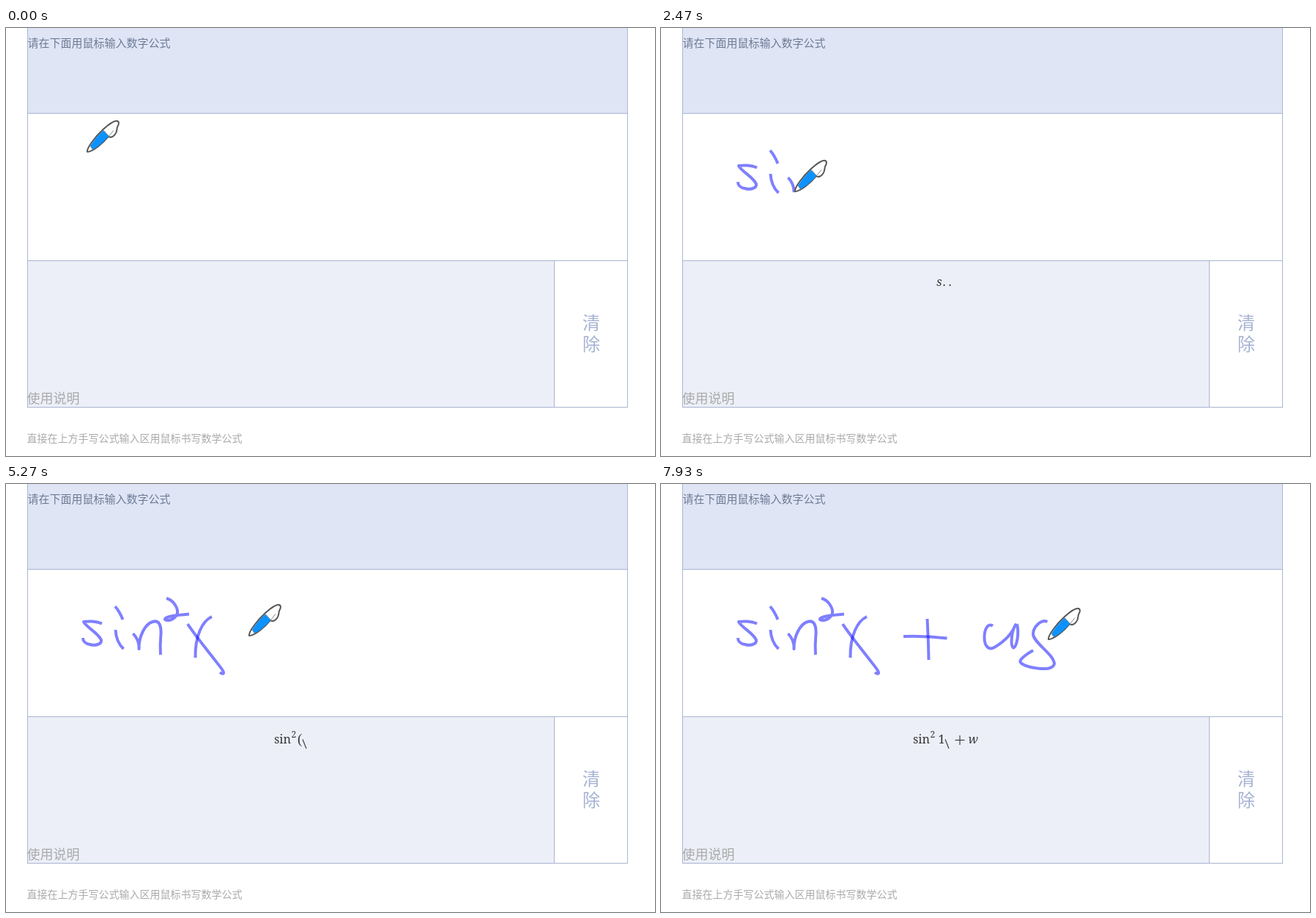
An HTML page that plays this animation: 886x584 px, repeating every 8000 ms.

```html
<!DOCTYPE html>
<html lang="zh">
<head>
<meta charset="utf-8">
<title>手写公式</title>
<style>
html, body { margin: 0; width: 100%; height: 100%; overflow: hidden; background: #fff; }
svg { display: block; width: 886px; height: 584px; }
.ui { font-family: "Noto Sans CJK SC", "Noto Sans CJK", sans-serif; }
.box { stroke: #abb5d2; stroke-width: 1; }
#ink path { fill: none; stroke: #00f; stroke-opacity: .5; stroke-width: 4; stroke-linejoin: round; }
#math { font-family: "Noto Serif", serif; font-size: 16.3px; fill: #333; }
#math path { fill: none; stroke: #333; stroke-width: 1.1; }
.it { font-style: italic; }
</style>
</head>
<body>
<svg viewBox="0 0 886 584">
  <rect class="box" x="29.5" y="-5.5" width="819" height="122" fill="#dfe5f5"/>
  <rect class="box" x="29.5" y="116.5" width="819" height="201" fill="#fff"/>
  <rect class="box" x="29.5" y="317.5" width="719" height="200" fill="#eceff7"/>
  <rect class="box" x="748.5" y="317.5" width="100" height="200" fill="#fff"/>
  <g class="ui" fill="#aaa">
    <text x="29.5" y="26" font-size="15" fill="#6d7a95">请在下面用鼠标输入数字公式</text>
    <text x="787" y="411" font-size="24" fill="#a5b2d1">清</text>
    <text x="787" y="440" font-size="24" fill="#a5b2d1">除</text>
    <text x="28.5" y="512" font-size="18">使用说明</text>
    <text x="28.5" y="565" font-size="14">直接在上方手写公式输入区用鼠标书写数学公式</text>
  </g>
  <g id="math"></g>
  <g id="ink"></g>
  <g id="pen" stroke-linejoin="round">
    <path fill="#fff" stroke="#555" stroke-width="2" d="M111 169C110 164 121 149 133 138C142 130 149 126 152 127C155 128 154 132 152 135C151 138 152 141 149 145C146 149 143 150 140 148C132 158 118 169 111 169Z"/>
    <path fill="#0c92ff" d="M115 161C120 153 127 145 133 139.500L140.500 147.500C134 155 126 162 118.500 166Z"/>
    <path fill="none" stroke="#888" stroke-width="1" d="M133 139.500L140.500 147.500L147 139.500M115 161L118.500 166"/>
  </g>
</svg>
<script>
const LOOP = 8000, FPS = 15;
const NS = 'http://www.w3.org/2000/svg';
const ink = document.getElementById('ink');
const pen = document.getElementById('pen');
const math = document.getElementById('math');

// start, end, path, easing power
const strokes = [
  [650, 1400, 'M131 190.500C123 187 112 187 106 188C109 195 127 204 130 213C131 219 121 221 115 219C108 218 105 214 105 210'],
  [1600, 1800, 'M149.500 199C150 210 153 218 160.500 225'],
  [2000, 2140, 'M149 167Q155 174 159.500 185'],
  [2330, 3070, 'M173.500 204C179 210 182 218 181.500 225C181 208 190 191 200 188C209 185 212 193 211.500 205Q210 220 211 233'],
  [3270, 3550, 'M281 181C268 187 258 207 258.500 237'],
  [3730, 4130, 'M248 191C257 205 271 222 285 240C292 249 298 256 297 258Q296 260 292 257'],
  [4330, 4880, 'M219 156C228 158 235 169 234 176C232 184 222 188 217 185C216 181 232 179 250 177.500'],
  [5290, 5530, 'M331 208Q362 207 390.500 210.500'],
  [5670, 5860, 'M363.500 184Q365 212 365.500 240'],
  [6130, 7080, 'M453 193.500C446 189 441 199 441.500 211C442 222 448 227 455 223C467 216 478 207 484 192C478 202 477 221 481 223.500C486 222 489 204 486 191'],
  [7330, 7925, 'M527.500 188C519 184 508 195 508 205C509 217 535 231 537 245C536 252 525 253 514 251.500C502 250 489 246 490.500 241C493 236 501 231 508 227', 1.6]
].map(([from, to, d, pow = 1]) => {
  const el = document.createElementNS(NS, 'path');
  el.setAttribute('d', d);
  ink.appendChild(el);
  return { from, to, pow, el, len: el.getTotalLength() };
});

// Pen tip positions while lifted: time, x, y
const hover = [
  [0, 110, 170], [130, 112, 168], [370, 155, 166], [1533, 146, 205],
  [3667, 245, 193], [5200, 331, 208], [6000, 444, 196],
  [7220, 533, 189], [7933, 528, 213], [8000, 531, 208]
];
const keys = hover.slice();
for (const s of strokes) {
  const a = s.el.getPointAtLength(0), b = s.el.getPointAtLength(s.len);
  keys.push([s.from, a.x, a.y], [s.to, b.x, b.y]);
}
keys.sort((a, b) => a[0] - b[0]);

const put = (x, y, s, extra = '') => `<text x="${x}" y="${y}" ${extra}>${s}</text>`;
const line = d => `<path d="${d}"/>`;
const small = 'font-size="12"', italic = 'class="it"';
const paren = (x, y) => put(x, y, '(', 'font-family="Liberation Serif, serif" font-size="19"');
const slash = x => line(`M${x} 348.500l5 12.500`);
const minus = x => line(`M${x} 349.500h13`);
const plus = x => minus(x) + line(`M${x + 6.5} 343v13`);
const sin = (x, y) => put(x, y, 'sin');
const sin2 = x => sin(x, 354) + put(x + 23.5, 346, '2', small);
const power = x => sin2(x) + paren(x + 32, 354) + slash(x + 39);
const sum = x => sin2(x) + put(x + 34.5, 354, '1') + slash(x + 44) + plus(x + 57.5);

const results = [
  [0, ''],
  [1600, put(385, 352, 's', italic)],
  [2260, put(376, 352, 's', italic) + put(384.5, 352, '.') + put(392.5, 352, '.')],
  [3190, sin(376.5, 350)],
  [3990, sin(372.5, 351) + paren(396, 351)],
  [4460, sin(370, 351) + paren(393.5, 351) + put(401, 351, '.')],
  [5120, power(366)],
  [5790, power(357.5) + minus(405)],
  [6520, sum(354)],
  [7390, sum(344) + put(419.500, 354, 'w', italic)]
];

function tipAt(t) {
  const s = strokes.find(s => t >= s.from && t < s.to);
  if (s) {
    const p = s.el.getPointAtLength(s.len * progress(s, t));
    return [p.x, p.y];
  }
  let i = 0;
  while (i < keys.length - 2 && keys[i + 1][0] <= t) i++;
  const [t0, x0, y0] = keys[i], [t1, x1, y1] = keys[i + 1];
  const p = (t - t0) / (t1 - t0);
  return [x0 + (x1 - x0) * p, y0 + (y1 - y0) * p];
}

function progress(s, t) {
  const p = Math.min(1, Math.max(0, (t - s.from) / (s.to - s.from)));
  return p ** s.pow;
}

let shown = null;
function draw(time) {
  const step = Math.floor((time % LOOP + 5) * FPS / 1000) % (LOOP * FPS / 1000);
  const t = step < 2 ? 0 : step * 1000 / FPS;
  for (const s of strokes) {
    const p = progress(s, t);
    s.el.style.display = p > 0 ? '' : 'none';
    s.el.style.strokeDasharray = p < 1 ? `${p * s.len} ${s.len + 10}` : 'none';
  }
  const [x, y] = tipAt(t);
  pen.setAttribute('transform', `translate(${Math.round(x - 110)} ${Math.round(y - 170)})`);
  const result = results.filter(r => r[0] <= t).pop()[1];
  if (result !== shown) math.innerHTML = shown = result;
}

const start = performance.now();
function tick() {
  draw(performance.now() - start);
  requestAnimationFrame(tick);
}
tick();
</script>
</body>
</html>
```
